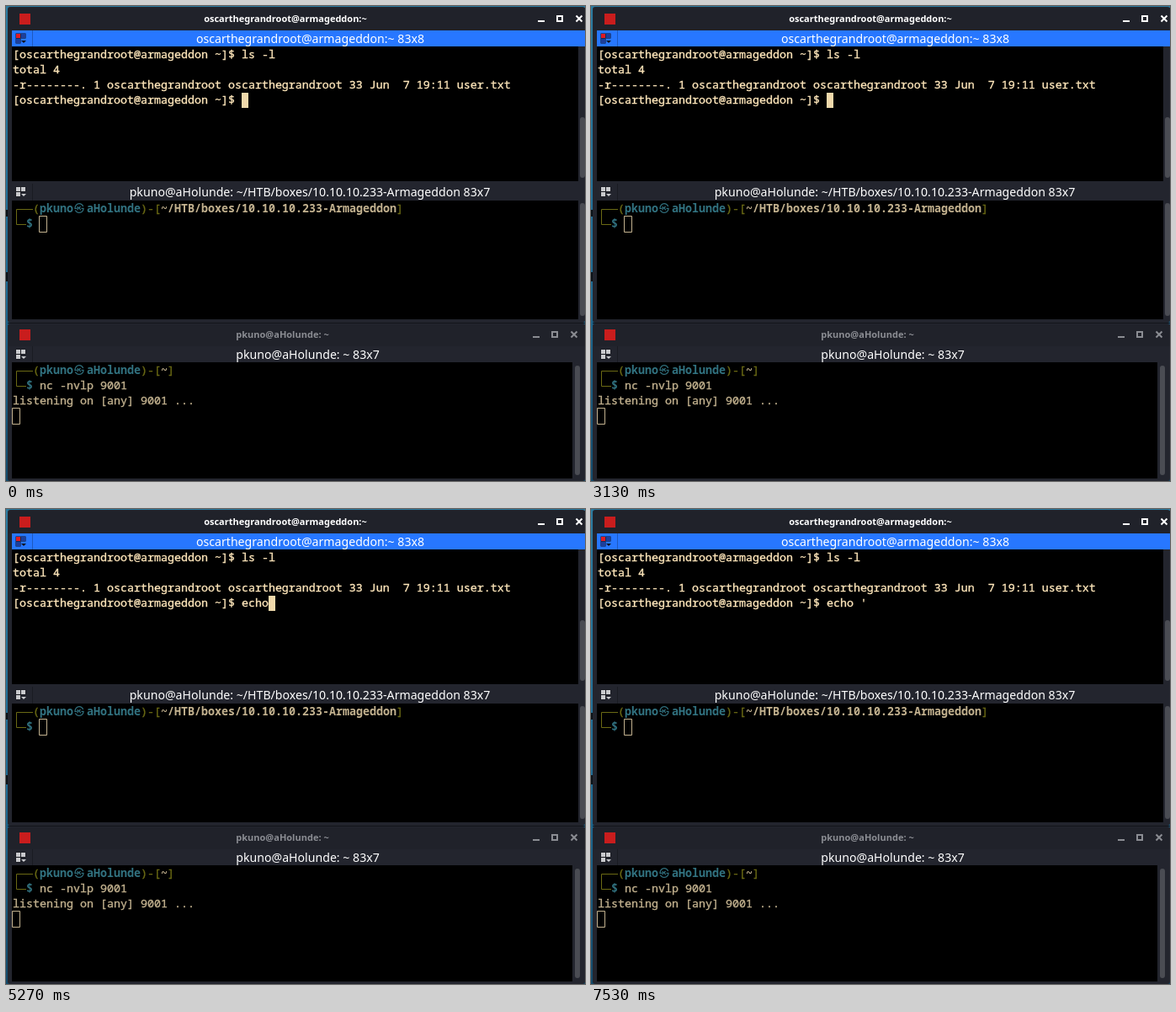
Write an HTML page that moves like this. It is 688 by 564 pixels and loops after 8 s.

```html
<!DOCTYPE html>
<html lang="en">
<head>
<meta charset="utf-8">
<title>Terminals</title>
<style>
  html, body { margin: 0; width: 100%; height: 100%; overflow: hidden; background: #1f2229; }
  svg { display: block; width: 688px; height: 564px; }
  text { white-space: pre; stroke-width: 0; }
  .mono { font: 13.333px "Noto Sans Mono", "DejaVu Sans Mono", monospace; stroke-width: .35px; }
  .bold { font-weight: 700; stroke-width: 0; }
  .mark { font: 700 12px "Noto Sans CJK KR", "Noto Sans CJK JP", sans-serif; }
  .head { font: 14.13px "Noto Sans", "Open Sans", sans-serif; text-anchor: middle; }
  .title { font: 700 11px "Noto Sans", "Open Sans", sans-serif; text-anchor: middle; }
</style>
</head>
<body>
<svg id="stage" viewBox="0 0 688 564">
  <defs>
    <linearGradient id="desk" x1="0" y1="0" x2="0" y2="1">
      <stop offset="0" stop-color="#2b7ba0"/>
      <stop offset=".6" stop-color="#1d6a93"/>
      <stop offset="1" stop-color="#124a6b"/>
    </linearGradient>
  </defs>
</svg>
<script>
const stage = document.getElementById('stage');
const LOOP = 8000;
const USER = 'oscarthegrandroot', HOST = 'armageddon';
const LOCAL = 'pkuno', BOX = 'aHolunde';
const FRAME = '#23252e', CREAM = '#ffe7bb', BLOCK = '#f0d9ab', DIM = '#c3b28f';
const OLIVE = '#6b6a14', TEAL = '#317280';

function add(tag, attrs, content = '') {
  const el = document.createElementNS('http://www.w3.org/2000/svg', tag);
  for (const key in attrs) el.setAttribute(key, attrs[key]);
  el.textContent = content;
  return stage.appendChild(el);
}
const rect = (x, y, width, height, fill, rx = 0) => add('rect', { x, y, width, height, fill, rx });
const line = (d, stroke, w = 1) => add('path', { d, stroke, 'stroke-width': w, fill: 'none' });
const label = (cls, x, y, fill, str) => add('text', { class: cls, x, y, fill, stroke: fill }, str);
// Terminal text on an 8 px column grid; top is the row's upper edge.
const mono = (col, top, fill, str, bold) =>
  label(bold ? 'mono bold' : 'mono', 8 + col * 8, top + 13, fill, str);

function titleBar(x, y, color, cx, str) {
  rect(16, y - 6, 13, 13, '#c91d1d');
  label('title', cx, y + 4, color, str);
  line(`M${x} ${y + 3}h8`, color, 2);
  line(`M${x + 23} ${y - 3}h6v6h-6z`, color, 2);
  line(`M${x + 45.5} ${y - 3.5}l7 7m0-7l-7 7`, color, 2);
}

function groupIcon(y, tint, edge) {
  [[12, 0], [18, 0], [12, 6]].forEach(([x, dy], i) => {
    rect(x - .5, y + dy - .5, 6, 6, edge);
    rect(x, y + dy, 5, 5, tint[i]);
  });
  add('path', { d: `M18 ${y + 8}h6l-3 3z`, fill: tint[3] });
}

function header(y, h, fill, cx, str, tint, edge) {
  rect(7, y, 681, h, fill);
  rect(31, y, 1, h, 'rgba(0,0,0,.25)');
  groupIcon(y + 4, tint, edge);
  label('head', cx, y + 15, '#fff', str);
}

function prompt(top, path) {
  const y = top + 9.5;
  line(`M32 ${y}H12.5V${y + 18}H24`, OLIVE);
  mono(3, top, OLIVE, '(');
  mono(4, top, TEAL, LOCAL, true);
  label('mark', 81, top + 13, TEAL, '㉿');
  mono(11, top, TEAL, BOX, true);
  mono(19, top, OLIVE, ')-[');
  mono(22, top, DIM, path, true);
  mono(22 + path.length, top, OLIVE, ']');
  mono(2, top + 18, TEAL, '$', true);
}

const hollow = (x, y) => line(`M${x} ${y}h9v19h-9z`, DIM);
const grey = Array(4).fill('#c9cacd');

// Desktop edge and window frames
rect(0, 0, 688, 564, 'url(#desk)');
rect(0, 242, 2, 8, '#0b1117');
rect(0, 316, 2, 11, '#0b1117');
rect(2, 1, 686, 375, FRAME, 3);
rect(2, 376, 686, 1, '#121419');
rect(2, 377, 686, 187, FRAME, 3);
rect(3, 2, 685, 27, '#20222a');
rect(3, 378, 685, 26, '#20222a');

// Upper window
titleBar(632, 15, '#fff', 332, `${USER}@${HOST}:~`);
header(29, 19, '#2777ff', 361.5, `${USER}@${HOST}:~ 83x8`,
  ['#e01b24', '#1d3f9c', '#1d3f9c', '#10131c'], '#10131c');
rect(7, 48, 673, 160, '#000');
rect(682, 132, 6, 72, '#4a4c53', 3);
const shell = `[${USER}@${HOST} ~]$ `;
mono(0, 49, CREAM, shell + 'ls -l');
mono(0, 67, CREAM, 'total 4');
mono(0, 85, CREAM, `-r--------. 1 ${USER} ${USER} 33 Jun  7 19:11 user.txt`);
mono(0, 103, CREAM, shell);
const typed = mono(shell.length, 103, CREAM, '');
const block = rect(280, 103, 8, 18, BLOCK);

header(211, 20, FRAME, 361, `${LOCAL}@${BOX}: ~/HTB/boxes/10.10.10.233-Armageddon 83x7`, grey, '#14161b');
rect(7, 231, 673, 141, '#000');
rect(682, 234, 6, 134, '#4a4c53', 3);
prompt(232, '~/HTB/boxes/10.10.10.233-Armageddon');
hollow(39.5, 249.5);

// Lower window
titleBar(626, 390, '#8b8d93', 328.5, `${LOCAL}@${BOX}: ~`);
header(404, 19, FRAME, 358.5, `${LOCAL}@${BOX}: ~ 83x7`, grey, '#14161b');
rect(7, 423, 666, 138, '#000');
rect(676, 427, 6, 130, '#4a4c53', 3);
prompt(424, '~');
mono(4, 442, DIM, 'nc -nvlp 9001');
mono(0, 460, DIM, 'listening on [any] 9001 ...');
hollow(7.5, 477.5);

const pointer = add('path', { d: 'M0 0h4v1h-1.5v7h1.5v1h-4v-1h1.5v-7h-1.5z', fill: '#e4e4e4' });

// [time, typed characters, block visible]
const COMMAND = "echo '";
const KEYS = [
  [0, 0, 1], [3470, 1, 1], [3800, 2, 1], [4070, 3, 1], [4330, 4, 1], [4670, 4, 0],
  [5270, 4, 1], [5530, 5, 1], [5870, 5, 0], [6470, 5, 1], [7270, 6, 1], [7530, 6, 0]
];
const MOVE = { start: 930, end: 1530, hide: 3130, steps: 9, from: [9, 506], to: [315, 119] };

function draw(t) {
  const [, count, visible] = KEYS.findLast(key => key[0] <= t);
  typed.textContent = COMMAND.slice(0, count);
  block.setAttribute('x', 280 + count * 8);
  block.style.display = visible ? '' : 'none';

  const shown = t >= MOVE.start && t < MOVE.hide;
  pointer.style.display = shown ? '' : 'none';
  if (shown) {
    const raw = Math.min(1, (t - MOVE.start) / (MOVE.end - MOVE.start));
    const p = Math.floor(raw * MOVE.steps + .02) / MOVE.steps;
    const ease = 1 - (1 - p) ** 2;
    const [x, y] = MOVE.from.map((a, i) => Math.round(a + (MOVE.to[i] - a) * ease));
    pointer.setAttribute('transform', `translate(${x} ${y})`);
  }
}

const origin = performance.now();
function tick() {
  draw((performance.now() - origin) % LOOP);
  requestAnimationFrame(tick);
}
tick();
</script>
</body>
</html>
```
